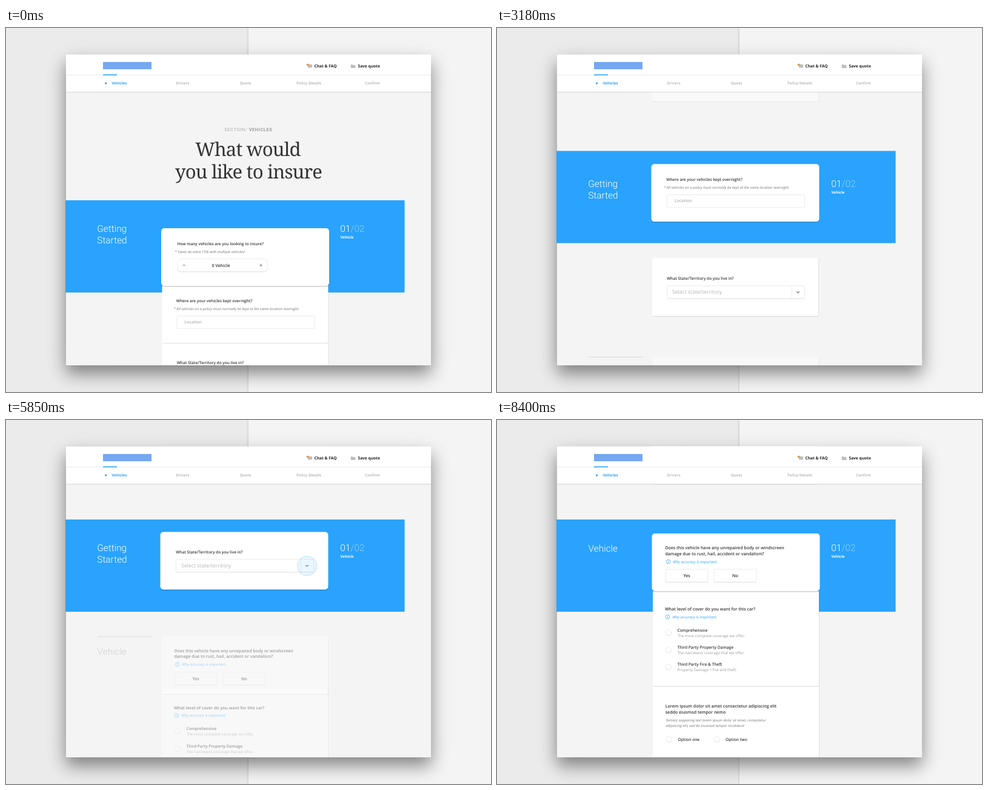
Recreate the animation shown at these times as an HTML page. Size 800 by 600 pixels, loop 9000 ms.

```html
<!DOCTYPE html>
<html lang="en">
<head>
<meta charset="utf-8">
<title>Insurance quote form</title>
<style>
html, body { margin: 0; width: 100%; height: 100%; overflow: hidden; background: #ebebeb; }
.stage { position: relative; width: 800px; height: 600px; overflow: hidden; background: #ebebeb; }
.half { position: absolute; left: 400px; top: 0; width: 400px; height: 600px; background: #f4f4f4; box-shadow: 0 0 4px rgba(0,0,0,.2); }
.window { position: absolute; left: 99px; top: 43.5px; width: 602px; height: 512.5px; background: #f4f4f4;
  box-shadow: 0 14px 26px rgba(0,0,0,.42), 0 10px 45px rgba(0,0,0,.06); }
svg { position: absolute; left: 0; top: 0; }
text { font-family: 'Open Sans', sans-serif; fill: #333; white-space: pre; text-rendering: geometricPrecision; }
.h { font-size: 6.5px; font-weight: 600; }
.h7 { font-size: 7px; font-weight: 600; }
.opt { font-size: 6.6px; font-weight: 600; }
.sub { font-size: 6.3px; fill: #999; }
.note { font-size: 6px; font-style: italic; fill: #777; }
.why { font-size: 6.2px; font-style: italic; fill: #29a3fd; }
.pick { font-size: 8.65px; }
.nav { font-size: 6.15px; font-weight: 700; fill: #bbb; }
.top { font-size: 6.6px; font-weight: 700; fill: #222; }
.big { font-family: Roboto, sans-serif; font-size: 15.4px; font-weight: 300; fill: #fff; }
.title { font-family: 'Noto Serif', serif; font-size: 31px; font-weight: 300; letter-spacing: -.8px; text-anchor: middle; }
.section { font-family: Roboto, sans-serif; font-size: 7.4px; letter-spacing: .6px; fill: #aaa; text-anchor: middle; }
.mid { text-anchor: middle; }
.box { fill: #fff; stroke: #e8e8e8; stroke-width: .8; }
.under { fill: #000; fill-opacity: .1; }
.tap { fill: #29a3fd; fill-opacity: .09; stroke: #29a3fd; stroke-opacity: .35; stroke-width: .8; }
</style>
</head>
<body>
<div class="stage">
  <div class="half"></div>
  <div class="window"></div>
  <svg id="art" width="800" height="600" viewBox="0 0 800 600"></svg>
</div>
<script>
const LOOP = 9000;
const BLUE = '#29a3fd';

// Markup helpers; inside a card y = 0 is the middle of its heading.
const text = (x, y, cls, str, more = '') => `<text x="${x}" y="${y}" class="${cls}" ${more}>${str}</text>`;
const rect = (x, y, w, h, more = '') => `<rect x="${x}" y="${y}" width="${w}" height="${h}" ${more}/>`;
const box = (x, y, w, h, r = 1) => rect(x, y, w, h, `rx="${r}" class="box"`);
const raised = (x, y, w, h, r = 1) => rect(x, y + 1, w, h, `rx="${r}" class="under"`) + box(x, y, w, h, r);
const stroke = (d, color, w = 1) => `<path d="${d}" fill="none" stroke="${color}" stroke-width="${w}"/>`;
const radio = (x, y) => `<circle cx="${x}" cy="${y + .5}" r="4.8" class="under"/><circle cx="${x}" cy="${y}" r="4.6" class="box"/>`;
const tapMark = (x, y) => `<circle class="tap" cx="${x}" cy="${y}" r="16" opacity="0"/>`;
const why = (x, y) => `<circle cx="${x}" cy="${y}" r="3.3" fill="none" stroke="${BLUE}" stroke-width=".7"/>` +
  stroke(`M${x} ${y - .6}v2.2M${x} ${y - 1.8}v.8`, BLUE, .7) + text(x + 7.7, y + 2.2, 'why', 'Why accuracy is important.');
const button = (x, label) => raised(x, 35.5, 70, 21) + text(x + 35, 48.6, 'h7 mid', label);
const choice = (y, name, info) => radio(283, y + 4) + text(297.5, y + 2.4, 'opt', name) + text(297.5, y + 11.2, 'sub', info);
const group = (id, body) => `<g id="${id}">${body}</g>`;

const states = ['Arizona', 'California', 'Colorado', 'Florida', 'Georgia'];
const LIST_H = 121;

const cards = [
  { id: 'count', left: 256, top: -25.5, h: 95,
    x: [1.5, [300, 700, -1.5]],
    y: [355.5, [300, 700, -50], [2760, 525, -283]],
    fade: [1, [2760, 500, -.6]],
    focus: [1, [2250, 210, -1]],
    body: text(281, 2.4, 'h', 'How many vehicles are you looking to insure?') +
      text(277, 15, 'note', '* Saves an extra 15% with multiple vehicles!') +
      raised(281.5, 25, 148.5, 21, 6) + stroke('M290 35.5h4.6M416.7 35.5h4.6M419 33.2v4.6', '#777', .9) +
      text(353, 38, 'h7 mid', '0 Vehicle', 'id="amount"') + tapMark(419.8, 35.5) },
  { id: 'place', left: 256, top: -25.5, h: 95,
    x: [1.5, [330, 820, -1.5]],
    y: [449.5, [330, 820, -49.5], [2760, 600, -191], [4590, 705, -183]],
    fade: [1, [4590, 700, -.8]],
    focus: [0, [2250, 210, 1], [4290, 210, -1]],
    body: text(279.3, 2.4, 'h', 'Where are your vehicles kept overnight?') +
      text(275, 15, 'note', '* All vehicles on a policy must normally be kept at the same location overnight.') +
      box(280.5, 25, 227, 21) + text(292.8, 37.6, 'h7', '', 'id="town"') },
  { id: 'state', left: 256, top: -33, h: 95,
    x: [1.5, [360, 900, -1.5]],
    y: [551.5, [360, 900, -49.5], [2880, 631, -191.5], [4690, 753, -93], [7000, 700, -174]],
    fade: [1, [7000, 700, -.6]],
    focus: [0, [4290, 210, 1], [6900, 210, -1]],
    body: text(280.2, 2.4, 'h', 'What State/Territory do you live in?') +
      raised(280.5, 12, 227, 21) + stroke('M486.5 12v21', '#e8e8e8', .8) +
      stroke('M494.4 21.6l2.2 2.2l2.2 -2.2', '#666', 1.1) + text(289, 25.6, 'pick', '', 'id="region"') +
      group('list', rect(280.5, 34, 227, 0, 'class="box" id="sheet"') +
        states.map((s, i) => text(289, 49 + i * 24, 'pick', s)).join('')) + tapMark(496.6, 23) },
  { id: 'damage', left: 257, top: -23.5, h: 95,
    x: [0],
    y: [681, [300, 900, -50], [2860, 814, -191], [4790, 717, -60], [7000, 1270, -169.5]],
    fade: [.45, [6900, 400, .55]],
    focus: [0, [6900, 210, 1]],
    body: text(277.4, 2.5, 'h7', 'Does this vehicle have any unrepaired body or windscreen') +
      text(277.4, 12, 'h7', 'damage due to rust, hail, accident or vandalism?') +
      why(282.5, 23) + button(278, 'Yes') + button(358, 'No') },
  { id: 'cover', left: 257, top: -29.5, h: 156.5,
    x: [0],
    y: [782, [300, 900, -50], [2960, 823, -191], [4790, 797, -67], [6980, 1330, -162.5]],
    fade: [.45, [7050, 700, .55]],
    focus: [0],
    body: text(277, 2.5, 'h7', 'What level of cover do you want for this car?') + why(281.5, 13) +
      choice(35, 'Comprehensive', 'The most complete coverage we offer.') +
      choice(63.5, 'Third Party Property Damage', 'The narrowest coverage that we offer.') +
      choice(91.5, 'Third Party Fire &amp; Theft', 'Property Damage + fire and theft.') },
  { id: 'extra', left: 257, top: -32.5, h: 130,
    x: [0],
    y: [642, [7000, 1400, -170.5]],
    fade: [.45, [7050, 900, .55]],
    focus: [0],
    body: text(277.7, 2.5, 'h7', 'Lorem ipsum dolor sit amet consectetur adipiscing elit') +
      text(277.7, 12, 'h7', 'seddo eiusmod tempor nemo') +
      text(278.2, 25.6, 'note', 'Tertiary suppoting text lorem ipsum dolor sit amet, consectetur') +
      text(278.2, 34.2, 'note', 'adipiscing elit, sed do eiusmod tempor incididunt') +
      radio(283.8, 55) + text(298.5, 57.4, 'opt', 'Option one') +
      radio(362.7, 55) + text(377, 57.4, 'opt', 'Option two') }
];

const parts = [
  { id: 'intro', y: [0, [300, 700, -20], [2760, 525, -300]], fade: [1, [2760, 500, -1]] },
  { id: 'band', y: [284, [300, 700, -20], [2760, 730, -100]], fade: [1] },
  { id: 'start', y: [331, [300, 800, -30], [2760, 852, -90], [7000, 700, -58]], fade: [1, [7000, 550, -1]] },
  { id: 'step', y: [331, [300, 800, -30], [2760, 852, -90]], fade: [1] },
  { id: 'next', y: cards[3].y, fade: [1] },
  ...cards
];

const header =
  rect(99, 105, 602, 1, 'fill="#000" fill-opacity=".09"') + rect(99, 106, 602, 1, 'fill="#000" fill-opacity=".03"') +
  rect(99, 43.5, 602, 61.5, 'fill="#fff"') + rect(99, 77, 602, 1, 'fill="#ebebeb"') +
  rect(160, 76.5, 23, 1.6, `fill="${BLUE}"`) + rect(160, 56, 80, 12, 'fill="#76a8f0"') +
  rect(498, 60, 7, 5.6, 'rx="1.5" fill="#bdbdbd"') + '<circle cx="497.7" cy="60.7" r="1.9" fill="#f0913a"/>' +
  text(508.5, 65.3, 'top', 'Chat &amp; FAQ') +
  '<path d="M568.8 60.2h3l1 1h3.6v4.8h-7.6z" fill="#bdbdbd"/>' + text(580.5, 65.3, 'top', 'Save quote') +
  `<circle cx="164.6" cy="91.1" r="1.6" fill="${BLUE}"/>` + text(174.4, 93.2, 'nav', 'Vehicles', `style="fill:${BLUE}"`) +
  [[280.3, 'Drivers'], [385.7, 'Quote'], [479, 'Policy Details'], [592, 'Confirm']]
    .map(([x, s]) => text(x, 93.2, 'nav', s)).join('');

const cardMarkup = c => group(c.id, rect(0, c.top + 1.2, 0, c.h, 'class="shade" fill="#000"') +
  rect(0, c.top, 0, c.h, 'class="face" fill="#fff"') + c.body);

const art = document.getElementById('art');
art.innerHTML =
  '<clipPath id="view">' + rect(98, 43.5, 603, 512.5) + '</clipPath><g clip-path="url(#view)">' +
  group('intro', text(399.8, 169.8, 'section', 'SECTION/ <tspan font-weight="500" fill="#8c8c8c">VEHICLES</tspan>') +
    text(399, 211, 'title', 'What would') + text(400, 248, 'title', 'you like to insure')) +
  group('band', rect(98, 0, 559.5, 152, `fill="${BLUE}"`)) +
  group('start', text(150.3, 5.4, 'big', 'Getting') + text(150.3, 24.3, 'big', 'Started')) +
  group('step', text(551.2, 5.4, 'big', '01<tspan fill-opacity=".5">/02</tspan>') +
    text(551.4, 15.8, 'nav', 'Vehicle', 'style="fill:#fff"')) +
  group('next', rect(151.5, -23.5, 89, 1, 'fill="#d9d9d9" id="rule"') + text(150.6, 6.8, 'big', 'Vehicle', 'id="label"')) +
  [...cards].reverse().map(cardMarkup).join('') + header + '</g>';

const el = id => document.getElementById(id);
const set = (node, attrs) => { for (const k in attrs) node.setAttribute(k, attrs[k]); };
const write = (node, str, fill) => {
  if (node.textContent !== str) node.textContent = str;
  node.style.fill = fill;
};
const clamp = u => Math.min(1, Math.max(0, u));
const ease = u => (u = clamp(u), u * u * (3 - 2 * u));

// A track is a first value followed by moves: [start, duration, change].
const at = (t, [v, ...moves]) => moves.reduce((sum, [start, dur, by]) => sum + by * ease((t - start) / dur), v);

for (const p of parts) p.node = el(p.id);
for (const c of cards) {
  c.face = c.node.querySelector('.face');
  c.shade = c.node.querySelector('.shade');
}
const rows = [...el('list').querySelectorAll('text')];

function tap(card, t, start) {
  const into = ease((t - start) / 240), out = ease((t - start - 420) / 240);
  set(card.node.querySelector('.tap'), { r: 16 + 6 * (1 - into) + 6 * out, opacity: into - out });
}

function draw(t) {
  for (const p of parts) {
    set(p.node, {
      transform: `translate(${p.x ? at(t, p.x) : 0} ${at(t, p.y)})`,
      opacity: clamp(at(t, p.fade))
    });
  }
  for (const c of cards) {
    const f = at(t, c.focus);
    const size = { x: c.left - 1.5 * f, width: 274 + 3 * f, rx: 1 + 4 * f };
    set(c.face, size);
    set(c.shade, { ...size, x: size.x + .7 * (1 - f), y: c.top + 1 + .7 * f, 'fill-opacity': .12 + .05 * f });
  }

  tap(cards[0], t, 1260);
  write(el('amount'), (t < 1560 ? 0 : 1) + ' Vehicle', '#333');

  const typed = 'Sugarhouse'.slice(0, Math.max(0, Math.floor((t - 3650) / 60) + 1));
  write(el('town'), typed || 'Location', typed ? '#333' : '#b0b0b0');

  tap(cards[2], t, 5550);
  const chosen = t >= 6420;
  write(el('region'), chosen ? 'California' : 'Select state/territory', chosen ? '#333' : '#b5b5b5');
  el('region').style.fontWeight = chosen ? 600 : 400;
  const open = ease((t - 5880) / 180) - ease((t - 6450) / 150);
  set(el('list'), { opacity: open > 0 ? 1 : 0 });
  set(el('sheet'), { height: LIST_H * open });
  rows.forEach((row, i) => set(row, { opacity: clamp((LIST_H * open - 18 - i * 24) / 6) }));

  // The next section's name turns white as it enters the band.
  const enter = clamp((335 - at(t, cards[3].y)) / 35);
  const tone = Math.round(207 + 48 * enter);
  el('label').style.fill = `rgb(${tone},${tone},${tone})`;
  set(el('rule'), { opacity: 1 - enter });
}

const begin = performance.now();
function tick() {
  draw((performance.now() - begin) % LOOP);
  requestAnimationFrame(tick);
}
draw(0);
requestAnimationFrame(tick);
</script>
</body>
</html>
```
